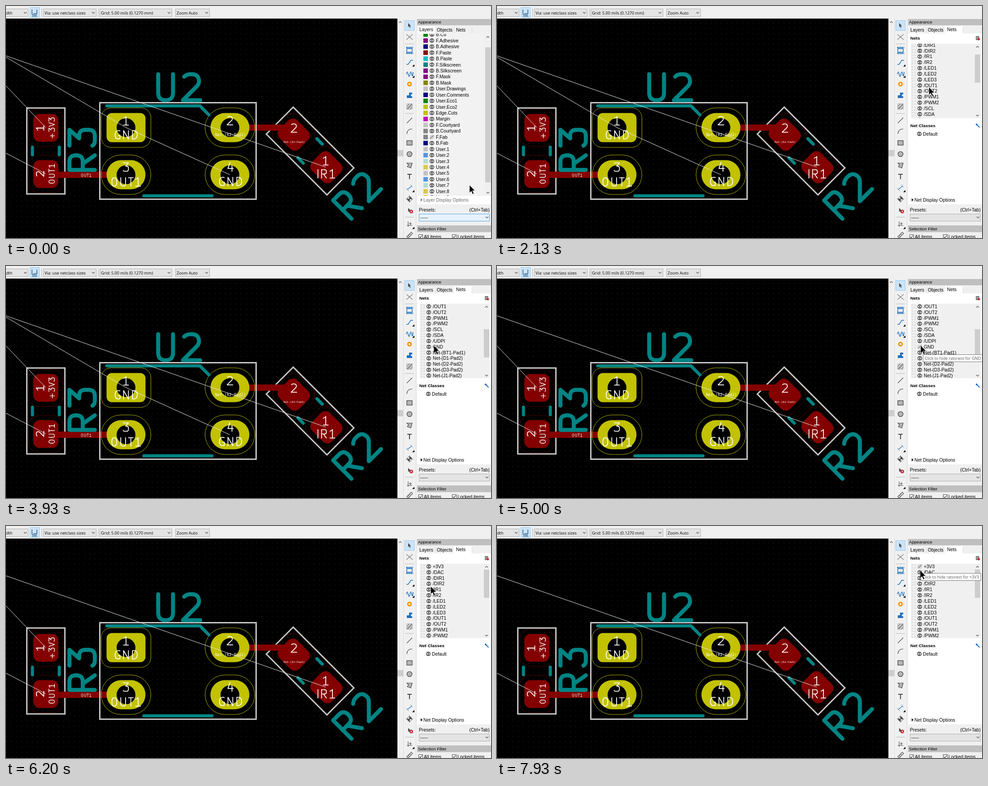
These frames come from a looping animation (1083x517 px, 8 s). An HTML page:

```html
<!DOCTYPE html>
<html lang="en">
<head>
<meta charset="utf-8">
<title>Board editor: nets panel</title>
<style>
html, body { margin: 0; width: 100%; height: 100%; overflow: hidden; background: #f0f0f0; }
svg { display: block; }
#stage { width: 100vw; height: 100vh; }
text { font: 10.3px "Liberation Sans", Arial, sans-serif; fill: #000; white-space: pre; }
.ui { font: 9.1px "Open Sans", "Noto Sans", sans-serif; }
.cap { font-size: 9.6px; }
.bold { font-size: 9.9px; font-weight: bold; }
.mono { font-family: "Noto Sans Mono", "DejaVu Sans Mono", monospace; fill: #fff; text-anchor: middle; }
</style>
</head>
<body>
<svg id="stage" viewBox="0 0 1083 517" preserveAspectRatio="none"></svg>
<script>
const TEAL = '#008484', RED = '#840000', YELLOW = '#c2c200', PALE = '#c8c8c8', BLUE = '#1a6fc0', INK = '#484848';

// Stroke font: advance width and path on a cap height of 21
const GLYPHS = {
  1: [20, 'M4 4Q8 3 10 0V21M4 21H16'],
  2: [20, 'M4 2Q6 0 9 0h1q6 0 6 6 0 2-2 4L3 21h14'],
  3: [20, 'M3 0h13l-7 8h2q5 0 5 5v3q0 5-5 5H7q-3 0-4-2'],
  4: [20, 'M14 7v14M9-1 4 14h13'],
  G: [21, 'M17 1q-2-1-4-1-8 0-8 10.5T13 21q2 0 4-1v-8h-4'],
  N: [22, 'M5 21V0l12 21V0'],
  D: [21, 'M5 0v21h4q8-1 8-10.5T9 0z'],
  O: [22, 'M5 8a6 8 0 0 1 12 0v5a6 8 0 0 1-12 0z'],
  U: [22, 'M5 0v15q0 6 6 6t6-6V0'],
  T: [16, 'M2 0h12M8 21V0'],
  I: [10, 'M5 0v21'],
  R: [21, 'M4 21V0h7q5 0 5 5.5T11 11H4M9 11l7 10'],
  V: [18, 'M2 0 9 21 16 0'],
  '+': [26, 'M5 13h16M13 5v16']
};

const rect = (x, y, w, h, fill, stroke = 'none', rx = 0, sw = 1) =>
  `<rect x="${x}" y="${y}" width="${w}" height="${h}" rx="${rx}" fill="${fill}" stroke="${stroke}" stroke-width="${sw}"/>`;
const path = (d, stroke, sw = 1, fill = 'none', more = '') =>
  `<path d="${d}" stroke="${stroke}" stroke-width="${sw}" fill="${fill}" ${more}/>`;
const circle = (x, y, r, fill, stroke = 'none', sw = 1) =>
  `<circle cx="${x}" cy="${y}" r="${r}" fill="${fill}" stroke="${stroke}" stroke-width="${sw}"/>`;
const text = (x, y, s, cls = '', more = '') => `<text x="${x}" y="${y}" class="${cls}" ${more}>${s}</text>`;
const group = (body, more = '') => `<g ${more}>${body}</g>`;
const view = (x, y, w, h, body) =>
  `<svg x="${x}" y="${y}" width="${w}" height="${h}" viewBox="${x} ${y} ${w} ${h}">${body}</svg>`;
const chevron = (x, y, dir = 1, c = '#505050') => path(`M${x - 3} ${y - 1.5 * dir}l3 ${3 * dir} 3 ${-3 * dir}`, c, 1.1);

function strokeText(s, cx, cy, scale, weight, color = '#fff', angle = 0) {
  let x = 0, body = '';
  for (const c of s) {
    body += `<path d="${GLYPHS[c][1]}" transform="translate(${x})"/>`;
    x += GLYPHS[c][0];
  }
  return group(body, `transform="translate(${cx} ${cy}) rotate(${angle}) scale(${scale}) translate(${-x / 2} -10.5)" fill="none" stroke="${color}" stroke-width="${weight / scale}" stroke-linecap="round" stroke-linejoin="round"`);
}

function eye(x, y, on = true) {
  const ring = `<ellipse cx="${x}" cy="${y}" rx="5.2" ry="4.7" `;
  return on
    ? ring + `fill="#4c4c4c"/><ellipse cx="${x}" cy="${y}" rx="3.9" ry="2.2" fill="#eee"/>` + circle(x, y, 1.6, '#4c4c4c')
    : ring + 'fill="#d4d4d4"/>' + path(`M${x - 4} ${y + 4}l8-8`, '#777', 1.3);
}

function resistor(cx, cy, angle) {
  let body = rect(-42.5, -95.7, 85, 191.5, 'none', PALE, 0, 3);
  for (const y of [-51.5, 51.5])
    body += rect(-38.5, y - 41, 77, 82, 'none', '#6a0000', 22, .8) + rect(-28, y - 31, 56, 62, RED, 'none', 14);
  body += path('M-30-8.5v17M30-8.5v17', TEAL, 7, 'none', 'stroke-linecap="round"');
  return group(body, `transform="translate(${cx} ${cy}) rotate(${angle})"`);
}

function hole(x, y, round) {
  return rect(x - 55.5, y - 44, 111, 88, 'none', '#b4b400', round ? 44 : 22, 1) +
    rect(x - 43.5, y - 32.5, 87, 65, YELLOW, 'none', round ? 32.5 : 12) + circle(x, y, 21, '#000');
}

function board() {
  const label = (s, x, y) => strokeText(s, x, y, .9, 1.8);
  const side = (s, x, y, k, w) => strokeText(s, x, y, k, w, '#fff', -90);
  return `<defs><pattern id="dots" x="268" y="271" width="11.65" height="11.65" patternUnits="userSpaceOnUse"><rect width="1" height="1" fill="#4a4a4a"/></pattern></defs>` +
    rect(0, 28, 874, 489, '#000') + rect(0, 28, 874, 489, 'url(#dots)') +
    resistor(89, 323, 0) + resistor(679, 323, -45) +
    path('M100 376H230M540 271H640', RED, 14) +
    hole(268, 271, false) + hole(500, 271, true) + hole(268, 376, true) + hole(500, 376, true) +
    rect(209.5, 215.5, 349, 215, 'none', PALE, 0, 3) +
    path('M225 222.5H433l20 20M308 423H460', TEAL, 7, 'none', 'stroke-linecap="round"') +
    strokeText('U2', 384, 181, 2.76, 9, TEAL) +
    strokeText('R3', 170, 320.6, 2.7, 9, TEAL, -90) +
    strokeText('R2', 783, 421.5, 2.75, 9, TEAL, -45) +
    path('M0 111 714 359M0 328 89 374', '#e8e8e8', 1) +
    path('M0 114 268 271 500 376', '#e8e8e8', 1, 'none', 'id="ratGnd"') +
    path('M0 178 89 271', '#e8e8e8', 1, 'none', 'id="ratV"') +
    label('1', 268, 256) + label('GND', 268, 287) + label('2', 500, 255.5) +
    label('3', 268, 359) + label('OUT1', 268, 392) + label('4', 501, 359) + label('GND', 501, 391) +
    label('2', 643, 272) + label('1', 714, 345) + label('IR1', 715, 374) +
    side('1', 76, 272, .8, 1.8) + side('2', 76, 374, .8, 1.8) +
    side('+3V3', 102, 272, .6, 1.4) + side('OUT1', 102, 374, .6, 1.4) +
    strokeText('OUT1', 179, 377, .31, 1, '#ddd') +
    text(501, 290, 'Net-(R2-Pad2)', 'mono', 'style="font-size:8.8px"') +
    text(643.5, 305, 'Net-(R2-Pad2)', 'mono', 'style="font-size:6.1px"');
}

function toolbar() {
  const combo = (x, w, s) => rect(x + .5, 6.5, w, 17, '#e4e4e4', '#adadad') +
    text(x + 3, 18.5, s, 'ui') + chevron(x + w - 6, 15);
  return rect(0, 0, 1083, 28, '#f0f0f0') + combo(-70, 119, '') + text(0, 18.5, 'dth', 'ui') +
    combo(83, 118, 'Via: use netclass sizes') + combo(209, 161, 'Grid: 5.00 mils (0.1270 mm)') + combo(378, 76, 'Zoom Auto') +
    path('M79.5 5v20M206.5 5v20', '#b0b0b0') + rect(53.5, 3.5, 21, 22, '#cce4f7', '#90c8f0') +
    path('M58 8v9q0 3 3 3h8M69 8v9h-8', '#2c5a88', 1.5) + path('M58 23H70', '#2c5a88', 1.2);
}

function tools() {
  const at = (y, body) => group(body, `transform="translate(901 ${y})"`);
  const arrow = 'M-3-5v9l2-2 2 4 1.500-.8-2-3.700h3z';
  let s = rect(874, 28, 209, 489, '#f0f0f0') + rect(874, 321, 13, 14, '#cdcdcd') + chevron(880.5, 36, -1) +
    path('M887.5 28V517M915.5 28V517', '#dcdcdc') + rect(890.5, 32.5, 21, 22, '#cce4f7', '#90c8f0') +
    path('M891 84.500h20M891 239.500h20M891 470.500h20', '#b8b8b8');
  s += at(43, path(arrow, 'none', 0, INK)) +
    at(69, path('M-7-6 7 6M-7 6 7-6', '#777', 1.1)) +
    at(99, rect(-6, -4, 12, 8, 'none', BLUE, 0, 1.5) + path('M-7-6.500H8M-7 6.500H8', BLUE, 3, 'none', 'stroke-dasharray="3 1.500"')) +
    at(125, path('M-7 5h4L3-4h5', BLUE, 1.5)) +
    at(150, path('M-7 2q2-10 4 0t4 0 4 0 3-5', BLUE, 1.5)) +
    at(174, circle(0, 0, 3.7, '#fff', '#f09010', 3)) +
    at(199, path('M-6 6V0h5v-6h7v4H3v4h3v4z', 'none', 0, BLUE)) +
    at(224, path('M-6 0 0-6M-6 5 5-6M-4 6 6-4M1 6 6 1', '#666', 1.4) + rect(-6, -6, 12, 12, 'none', '#888', 0, .8)) +
    at(255, path('M-6 6 6-6', INK, 1.2)) +
    at(279, path('M-6 6Q-5-5 6-5', INK, 1.2)) +
    at(305, rect(-6, -5, 12, 10, '#b5b5b5', INK, 0, 1.3)) +
    at(330, circle(0, 0, 5.7, '#b5b5b5', INK, 1.3)) +
    at(355, path('M-6-5H6L3 6-5 3l3-4z', INK, 1.2, '#b5b5b5')) +
    at(380, path('M-5-5H5M0-5V6', INK, 2)) +
    at(405, path('M-5 4 5-4', BLUE, 1.3) + path('M-7 1l5 6M2-7l5 6', BLUE, 1, 'none', 'stroke-dasharray="2 1"')) +
    at(430, circle(0, 0, 5, '#fff', INK, 1) + path('M0-5A5 5 0 0 1 5 0H-5A5 5 0 0 0 0 5z', 'none', 0, INK) + path('M-8 0H8M0-8V8', INK, 1)) +
    at(455, path(arrow, 'none', 0, INK) + circle(4, 3, 4, '#c82838') + path('M2.500 1.500l3 3m0-3-3 3', '#fff', 1)) +
    at(486, path('M-6 3H6M-3-6V6M2-4v6M-1-1h6', INK, 1.1)) +
    at(510, path('M-6 4 4-6l3 3L-3 7zM-3 1l2 2M0-2l2 2', INK, 1.2));
  for (const y of [135, 160, 415, 497]) s += path(`M912 ${y - 5}v5h-5z`, 'none', 0, '#000');
  return s;
}

const LAYERS = `B.Cu 008400,F.Adhesive 840084,B.Adhesive 000084,F.Paste 840000,B.Paste 00c2c2,F.Silkscreen 008484,
B.Silkscreen 840084,F.Mask 840084,B.Mask 848400,User.Drawings c2c2c2,User.Comments 000084,User.Eco1 008400,User.Eco2 c2c200,
Edge.Cuts c2c200,Margin c200c2,F.Courtyard c2c2c2,B.Courtyard 848484,F.Fab 848484,B.Fab 000084,User.1 c2c2c2,User.2 5994dc,
User.3 b4dbd2,User.4 d8c852,User.5 c2c2c2,User.6 5994dc,User.7 b4dbd2,User.8 d8c852,User.9 e8b23c`.split(/,\s*/).map(s => s.split(' '));

const NETS = ('+3V3 /DAC /DIR1 /DIR2 /IR1 /IR2 /LED1 /LED2 /LED3 /OUT1 /OUT2 /PWM1 /PWM2 /SCL /SDA /UDPI GND ' +
  'Net-(BT1-Pad1) Net-(D1-Pad2) Net-(D2-Pad2) Net-(D3-Pad2) Net-(J1-Pad2) Net-(J1-Pad3)').split(' ');
const ROW = 12.83;

function layersPage() {
  const rows = LAYERS.map(([name, color], i) => {
    const y = 63.6 + i * 13.44;
    return rect(932, y - 5, 10, 10, '#' + color) + eye(951, y, name !== 'F.Fab') + text(960, y + 3.7, name);
  }).join('');
  return rect(919, 61, 164, 362, '#f2f2f2') + view(919, 62, 150, 361, rows) +
    rect(1069, 62, 14, 361, '#f0f0f0') + rect(1070, 92, 12, 301, '#cdcdcd') + chevron(1076, 69, -1) + chevron(1076, 416) +
    path('M926 428.500l4 3.500-4 3.500z', 'none', 0, '#777') + text(932, 436, 'Layer Display Options', '', 'style="fill:#6d6d6d"') +
    rect(919, 45, 40, 17, '#fff') + text(923, 56, 'Layers') + text(1005, 57, 'Nets');
}

function netsPage() {
  const rows = NETS.map((name, i) => {
    const y = 90.3 + i * ROW, key = { '+3V3': 'V', GND: 'Gnd' }[name];
    const icon = key
      ? group(eye(944, y), `id="on${key}"`) + group(eye(944, y, false), `id="off${key}"`)
      : eye(944, y);
    return path(`M926 ${y - 3}h10M926 ${y + 3}h10`, '#dcdcdc', 3, 'none', 'stroke-dasharray="3 3"') + icon + text(953, y + 3.7, name);
  }).join('');
  return text(923, 75, 'Nets', 'bold') + text(923, 269.7, 'Net Classes', 'bold') +
    rect(1069, 67, 8, 9, '#777', 'none', 1) + path('M1069 70h8M1069 73h8', '#ddd', .8) + circle(1076, 74, 2.5, '#c82838') +
    path('M1071 264l6 6', BLUE, 2, 'none', 'stroke-linecap="round"') + circle(1071, 264, 2, BLUE) +
    rect(924, 84, 142, 166, '#f0f0f0') + view(924, 84, 142, 166, group(rows, 'id="rows"')) +
    rect(1066, 84, 14, 166, '#f0f0f0') + rect(1067, 97, 12, 63, '#cdcdcd').replace('<rect', '<rect id="thumb"') +
    chevron(1073, 91, -1) + chevron(1073, 244) +
    group(eye(943, 285) + text(951, 289, 'Default') + path('M926 428.500l4 3.500-4 3.500z', 'none', 0, '#000') +
      text(932, 436, 'Net Display Options'), 'id="late"') +
    rect(1000, 45, 40, 17, '#fff') + text(923, 57, 'Layers') + text(1005, 56, 'Nets');
}

function panel() {
  const check = (x, s) => rect(x + .5, 509.5, 9, 9, '#fff', '#444') + path(`M${x + 2} 514l2 2.500 4-5`, '#222', 1.2) + text(x + 12, 517.5, s);
  return rect(918, 29, 165, 14, '#bfbfbf') + text(920, 39.3, 'Appearance', 'cap') +
    rect(918, 61, 165, 381, '#fff') + path('M959.500 47v14M1000.500 47v14M1040.500 47v14', '#dadada') +
    group(layersPage(), 'id="layers"') + group(netsPage(), 'id="nets"') + text(962, 57, 'Objects') +
    text(922, 458, 'Presets:') + text(1080, 458, '(Ctrl+Tab)', '', 'text-anchor="end"') +
    rect(922.5, 463.5, 157, 16, '#e4e4e4', '#adadad').replace('<rect', '<rect id="preset"') +
    text(925, 474.5, '-----') + chevron(1074, 471) +
    rect(918, 489, 165, 15, '#bfbfbf') + text(920, 500, 'Selection Filter', 'cap') +
    check(921, 'All items') + check(996, 'Locked items');
}

document.getElementById('stage').innerHTML = board() + toolbar() + tools() + panel() +
  group(rect(.5, .5, 134, 16, '#fff', '#767676') + text(4, 12, '', 'ui', 'id="tipText" style="fill:#575757"'), 'id="tip"') +
  path('M0 0V17.300l4-3.800 2.900 6.700 2.700-1.200-2.900-6.500h5.400z', '#fff', .6, '#000', 'id="cursor"');

const el = {};
document.querySelectorAll('[id]').forEach(e => el[e.id] = e);
const show = (id, on) => el[id].style.display = on ? '' : 'none';

// Pointer moves: start, end, target x, target y
const MOVES = [[0, 800, 1005, 49], [1535, 2333, 957, 205], [2868, 3267, 957, 177], [3868, 4134, 946, 177],
  [5000, 5267, 951, 171.5], [5935, 6533, 945, 83], [6800, 6934, 945, 86], [7800, 7933, 945, 99]];
// Wheel notches: time and offset counted in notches of 2.25 rows
const WHEEL = [[0, 1], [2466, 2], [2600, 3], [2733, 4], [5200, 3], [5333, 2], [5600, 1], [5667, 0]];

function pointer(t) {
  let x = 1035, y = 399;
  for (const [a, b, tx, ty] of MOVES) {
    if (t <= a) break;
    const p = Math.min(1, (t - a) / (b - a)), e = p * p * (3 - 2 * p);
    x += (tx - x) * e;
    y += (ty - y) * e;
  }
  return [x, y];
}

function tip(t) {
  if (t >= 4399 && t < 5060) return [951, 197, 1, 'GND'];
  if (t >= 6530 && t < 6860) return [945, 114, t < 6660 ? 1 : t < 6790 ? .6 : .25, '+3V3'];
  if (t >= 7330) return [946, 105, 1, '+3V3'];
  return [0, 0, 0, ''];
}

function draw(time) {
  const t = Math.floor((time + 4) / 66.667) * 66.667 + 1;
  const nets = t > 930, gndOff = t > 4198, vOff = t > 6865;
  const notch = WHEEL.filter(w => w[0] <= t).pop()[1], scroll = notch * 2.25 * ROW;
  show('layers', !nets);
  show('nets', nets);
  show('late', t > 998);
  show('ratGnd', !gndOff); show('onGnd', !gndOff); show('offGnd', gndOff);
  show('ratV', !vOff); show('onV', !vOff); show('offV', vOff);
  el.rows.setAttribute('transform', `translate(0 ${-scroll})`);
  el.thumb.setAttribute('y', 97 + scroll * .38);
  const focus = t < 130;
  el.preset.setAttribute('fill', focus ? '#e5f1fb' : '#e4e4e4');
  el.preset.setAttribute('stroke', focus ? '#5aa5e0' : '#adadad');
  const [x, y, alpha, net] = tip(t);
  el.tip.setAttribute('transform', `translate(${x} ${y})`);
  el.tip.setAttribute('opacity', alpha);
  el.tipText.textContent = 'Click to hide ratsnest for ' + net;
  el.cursor.setAttribute('transform', `translate(${pointer(t)})`);
}

const start = performance.now();
function tick() {
  draw((performance.now() - start) % 8000);
  requestAnimationFrame(tick);
}
tick();
</script>
</body>
</html>
```
